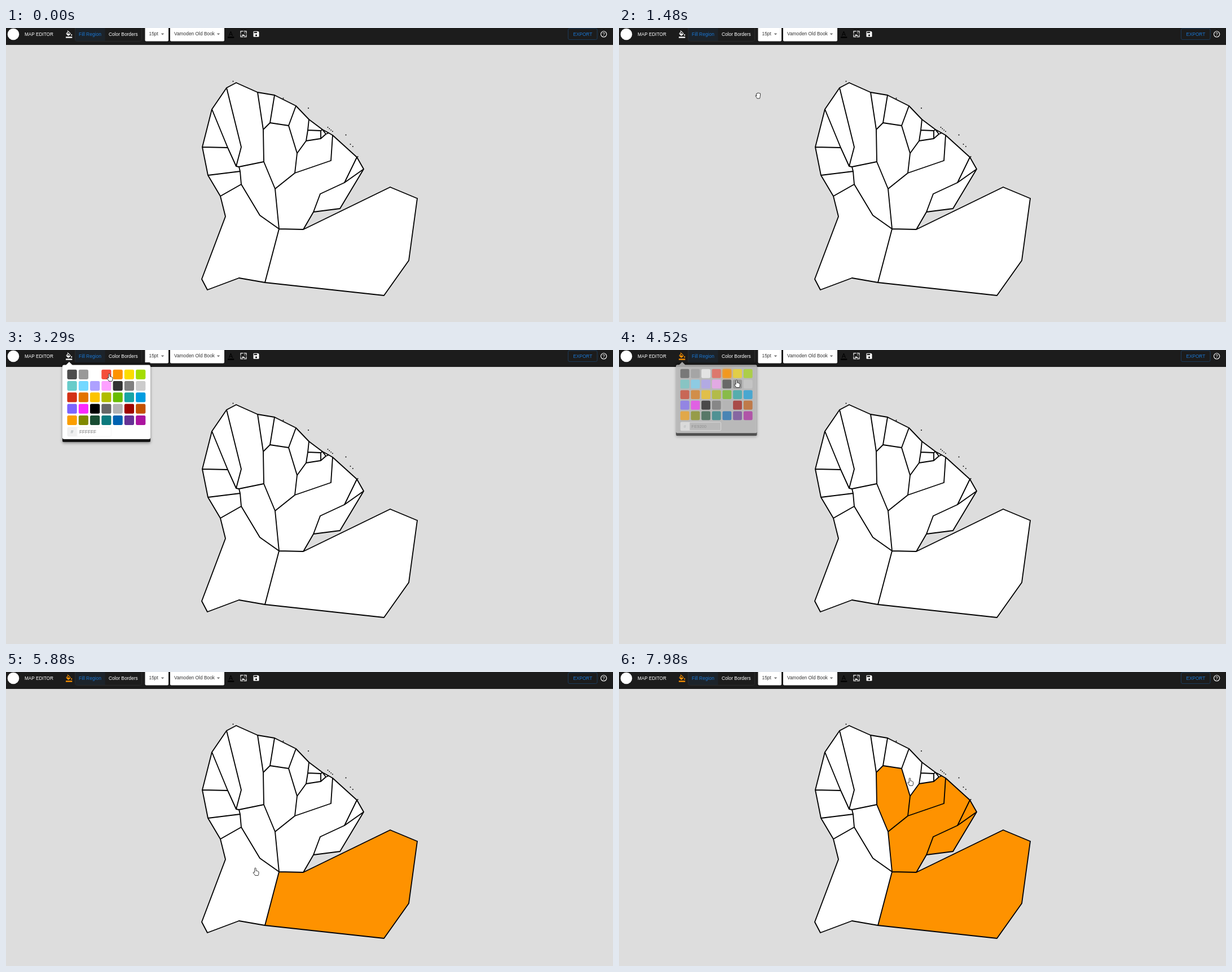
Animation of 1076 by 521 pixels, one loop 8 s. Source, as an HTML page with a canvas:

```html
<!DOCTYPE html>
<html lang="en">
<head>
<meta charset="utf-8">
<title>Map editor</title>
<style>
html, body { margin: 0; width: 100%; height: 100%; overflow: hidden; background: #ddd; }
canvas { display: block; }
</style>
</head>
<body>
<canvas id="stage" width="1076" height="521"></canvas>
<script>
const ctx = document.getElementById('stage').getContext('2d');
const LOOP = 8000;
const BLUE = '#1976d2', ORANGE = '#fe9200', DARK = '#1c1c1c';
const OPEN = 2620, PICK = 4280, CLOSE = 4450, SHIFT = 5270;

// Border corners of the map
const corners = {
  a: [391, 106], b: [408, 97], c: [446, 114], d: [476, 119], e: [514, 138], f: [537, 162],
  g: [561, 180], h: [572, 186], i: [579, 190], j: [622, 229], k: [634, 250], l: [592, 320],
  m: [545, 326], n: [527, 357], o: [484, 356], p: [681, 282], q: [729, 302], r: [714, 412],
  s: [670, 474], t: [459, 451], u: [413, 443], v: [357, 464], w: [347, 445], x: [389, 334],
  y: [380, 298], z: [358, 261], A: [348, 211], B: [365, 144], C: [393, 212], D: [408, 245],
  E: [417, 211], F: [413, 246], G: [417, 277], H: [450, 332], J: [457, 237], K: [456, 180],
  L: [468, 168], M: [501, 173], N: [516, 222], O: [512, 257], P: [477, 285], Q: [532, 200],
  R: [558, 196], S: [535, 181], T: [558, 182], U: [567, 188], V: [576, 235], W: [600, 274],
  X: [557, 294], Y: [415, 254]
};

// Regions as rings of corners; some get coloured at a given time
const blank = 'ABC BaEDC abcKJFDE cdLK deML efSQNM fgTS STRQ gTRU ghU ACDFYz zYGy JPoHGYF yGHotuvwx'.split(' ');
const painted = { onpqrst: SHIFT, POVijWXmno: 6150, KLMNOPJ: 6630, QRUhiVON: 6880, WklmX: 7160, jkW: 7460 };

function ringPath(ring) {
  const path = new Path2D();
  for (const c of ring) path.lineTo(...corners[c]);
  path.closePath();
  return path;
}

// Every shared edge is stroked only once
function borderPath(rings) {
  const path = new Path2D(), seen = new Set();
  for (const ring of rings) [...ring].forEach((c, n) => {
    const edge = [c, ring[(n + 1) % ring.length]].sort();
    if (seen.has(edge.join(''))) return;
    seen.add(edge.join(''));
    path.moveTo(...corners[edge[0]]);
    path.lineTo(...corners[edge[1]]);
  });
  return path;
}

const rings = [...blank, ...Object.keys(painted)];
const regions = rings.map(ring => ({ path: ringPath(ring), at: painted[ring] ?? Infinity }));
const borders = borderPath(rings);

const swatches = ('4d4d4d 999999 ffffff f44e3b fe9200 fcdc00 a4dd00 68ccca 73d8ff aea1ff fda1ff 333333 ' +
  '808080 cccccc d33115 e27300 fcc400 b0bc00 68bc00 16a5a5 009ce0 7b64ff fa28ff 000000 666666 b3b3b3 ' +
  '9f0500 c45100 fb9e00 808900 194d33 0c797d 0062b1 653294 ab149e').split(' ').map(hex => '#' + hex);

const pointer = new Path2D('M-1.2 8V1.2a1.2 1.2 0 0 1 2.4 0V5q2-.5 3.5 1.2 1.3 0 1.3 1.2V10q0 1.6-1 3.4H-.4q-1.2-2.4-3.3-4.5-.3-1.5 1-1.4z');
const grab = new Path2D('M-2 1L-3-2.6q.3-1.5 1.6-.6 .4-2.6 2-1.2 1.3-1.2 2 .5 2-.7 1.9 1.2L4 1.8q-.1 1.5-.9 3.3H-1.4Q-2.5 3-4.2.9q-.2-1.4 1-1z');

// Cursor stops: arrival, rest, x, y
const stops = [[160, 0, 1041, 520], [960, 30, 574, 261], [1480, 0, 246.5, 120], [1790, 30, 152, 43],
  [2220, 400, 110, 9], [3290, 500, 183, 42], [4110, 340, 200, 47], [5110, 0, 581.5, 325],
  [5230, 100, 594, 340], [5880, 0, 441.5, 347.5], [6010, 140, 505, 305], [6470, 160, 488, 238],
  [6880, 0, 546, 218], [7160, 0, 583, 296], [7420, 40, 620, 242], [7980, 20, 515.5, 188]];

const clamp = v => Math.max(0, Math.min(1, v));

// Eases away from and into stops with a rest, passes through the others
function cursorAt(t) {
  const n = stops.findIndex(s => s[0] > t);
  if (n < 0) return stops[stops.length - 1].slice(2);
  const [t0, rest0, x0, y0] = stops[n - 1], [t1, rest1, x1, y1] = stops[n];
  const u = clamp((t - t0 - rest0) / (t1 - t0 - rest0));
  const out = rest0 ? 0 : 1, into = rest1 ? 0 : 1;
  const k = u * u * (3 - 2 * u) + out * u * (1 - u) ** 2 - into * u * u * (1 - u);
  return [x0 + (x1 - x0) * k, y0 + (y1 - y0) * k];
}

function box(x, y, w, h, r, fill, stroke) {
  ctx.beginPath();
  ctx.roundRect(x, y, w, h, r);
  if (fill) { ctx.fillStyle = fill; ctx.fill(); }
  if (stroke) { ctx.strokeStyle = stroke; ctx.lineWidth = 1; ctx.stroke(); }
}

function disc(x, y, r, fill) {
  ctx.beginPath();
  ctx.arc(x, y, r, 0, Math.PI * 2);
  ctx.fillStyle = fill;
  ctx.fill();
}

function text(str, x, y, size, fill, align = 'left') {
  ctx.font = `${size}px "Liberation Sans", Arial, sans-serif`;
  ctx.textAlign = align;
  ctx.fillStyle = fill;
  ctx.fillText(str, x, y);
}

function triangle(x, y, w, h, fill) {
  ctx.beginPath();
  ctx.moveTo(x - w / 2, y);
  ctx.lineTo(x + w / 2, y);
  ctx.lineTo(x, y + h);
  ctx.fillStyle = fill;
  ctx.fill();
}

function at(x, y, draw) {
  ctx.save();
  ctx.translate(x, y);
  draw();
  ctx.restore();
}

function bucketIcon(color) {
  box(-5, 5, 11.3, 2.3, 0, color);
  disc(5.2, 2.2, 1.1, color);
  triangle(5.2, 1.8, 1.8, -1.8, color);
  at(-0.4, -0.6, () => {
    ctx.rotate(Math.PI / 4);
    box(-2.7, -2.7, 5.4, 5.4, 0.8, null, color);
    box(-2.7, -0.2, 5.4, 0.8, 0, color);
    triangle(0, -0.2, 5, 0, color);
    box(-4.8, -2.9, 2.2, 1, 0, color);
  });
  triangle(-0.4, -0.4, 7, 3.5, color);
}

function pictureIcon() {
  ctx.strokeStyle = '#fff';
  ctx.lineWidth = 1.1;
  for (const sx of [-1, 1]) for (const sy of [-1, 1]) {
    ctx.beginPath();
    ctx.moveTo(sx * 0.6, sy * 5);
    ctx.lineTo(sx * 5, sy * 5);
    ctx.lineTo(sx * 5, sy * 0.6);
    ctx.stroke();
  }
  triangle(-1, 3.3, 4.8, -2.8, '#fff');
  triangle(1, 3.3, 4.6, -2.2, '#fff');
  disc(1.9, -2, 0.8, '#fff');
}

function diskIcon() {
  box(-5, -5, 10, 10, [1, 2.6, 1, 1], '#fff');
  box(-3.9, -3.9, 5.6, 2.3, 0, DARK);
  disc(0, 2.2, 1.7, DARK);
}

function helpIcon() {
  ctx.beginPath();
  ctx.arc(0, 0, 5.1, 0, Math.PI * 2);
  ctx.strokeStyle = '#fff';
  ctx.lineWidth = 1.1;
  ctx.stroke();
  text('?', 0, 2.9, 8.2, '#fff', 'center');
}

function drawMap(t) {
  at(0, t < SHIFT ? 0 : -2, () => {
    for (const { path, at } of regions) {
      ctx.fillStyle = t < at ? '#fff' : ORANGE;
      ctx.fill(path);
    }
    ctx.lineCap = 'round';
    ctx.lineWidth = 1.85;
    ctx.strokeStyle = '#000';
    ctx.stroke(borders);
    for (const [x, y] of [[402.5, 94.5], [491.5, 124.5], [536, 142], [602.5, 189.5], [623.5, 228]]) disc(x, y, 1, '#000');
    for (let n = 0; n < 4; n++) disc(570.5 + n * 2.8, 176 + n * 2.4, 0.9, '#000');
    for (let n = 0; n < 2; n++) disc(610.5 + n * 4.3, 206 + n * 4, 0.9, '#000');
  });
}

function drawSelect(x, w, label) {
  box(x, -5, w, 28.5, 2, '#fff');
  text(label, x + 7, 13.3, 8.4, '#333');
  triangle(x + w - 10.5, 9.6, 5.6, 2.9, '#757575');
}

function drawToolbar(t) {
  box(0, 0, 1076, 30, 0, DARK);
  disc(13, 11, 10.3, '#fff');
  text('MAP EDITOR', 33, 13.8, 8.2, '#fff');
  at(111, 10.4, () => bucketIcon(t < CLOSE ? '#fff' : ORANGE));

  box(122.5, -5, 118, 28.5, 3, null, '#2b2b2b');
  box(123, -5, 52.5, 28, 0, '#1c232a');
  text('Fill Region', 129, 13.8, 8.45, BLUE);
  text('Color Borders', 182, 13.8, 8.4, '#fff');
  drawSelect(246.5, 41.5, '15pt');
  drawSelect(291, 96, 'Vamoden Old Book');

  text('A', 398.4, 13.7, 11, '#000', 'center');
  box(393, 15.4, 11.3, 2.3, 0, '#000');
  at(421, 10.6, pictureIcon);
  at(443.5, 10.7, diskIcon);
  box(996.5, 1, 51.5, 19.5, 2.5, null, '#1b3a59');
  text('EXPORT', 1022.3, 13.9, 8.25, BLUE, 'center');
  at(1059.6, 10.9, helpIcon);
}

function drawPicker(t) {
  const shown = t < CLOSE ? clamp((t - OPEN) / 200) : 1 - clamp((t - CLOSE) / 180);
  if (!shown) return;
  at(112, 22, () => {
    ctx.globalAlpha = shown;
    ctx.scale(0.8 + shown * 0.2, 0.8 + shown * 0.2);
    ctx.translate(-112, -22);

    ctx.shadowColor = 'rgba(0,0,0,.4)';
    ctx.shadowBlur = 5;
    ctx.shadowOffsetY = 2;
    box(100, 22, 156, 141, 2, '#151515');
    ctx.shadowOffsetY = 0;
    ctx.shadowColor = 'transparent';
    triangle(112, 27, 12, -6, '#fff');
    box(100, 26.5, 156, 131.5, 3, '#fff');

    swatches.forEach((color, n) => {
      ctx.shadowColor = color === ORANGE && t >= PICK ? color : 'transparent';
      box(108.5 + n % 7 * 20.27, 34.8 + Math.floor(n / 7) * 20.27, 17.2, 17.2, 2.4, color);
    });
    ctx.shadowColor = 'transparent';
    box(108.5, 136.5, 17.2, 17, [2.4, 0, 0, 2.4], '#f0f0f0');
    text('#', 117.1, 148, 8.4, '#98a1a4', 'center');
    box(126, 137, 60.5, 16, [0, 2, 2, 0], null, '#f4f4f4');
    text(t < CLOSE ? 'FFFFFF' : 'FE9200', 130, 148, 8.2, '#777');
  });
}

function drawTooltip(t) {
  if (t >= OPEN) return;
  ctx.globalAlpha = clamp((t - 2080) / 120);
  box(95, 30, 33, 11.3, 2, '#000');
  text('Fill Color', 111.5, 37.8, 6.3, '#fff', 'center');
  ctx.globalAlpha = 1;
}

function drawCursor(t) {
  if (t < stops[0][0]) return;
  const [x, y] = cursorAt(t);
  const overMap = regions.some(r => ctx.isPointInPath(r.path, x, y));
  const overUi = y < 30 || (t > OPEN && t < CLOSE + 100);
  const shape = overMap || overUi || t > 5000 ? pointer : grab;
  at(x, y, () => {
    ctx.lineJoin = 'round';
    ctx.lineWidth = 0.9;
    ctx.fillStyle = '#fff';
    ctx.strokeStyle = '#222';
    ctx.fill(shape);
    ctx.stroke(shape);
  });
}

function frame() {
  const t = performance.now() % LOOP;
  box(0, 0, 1076, 521, 0, '#ddd');
  drawMap(t);
  drawToolbar(t);
  drawPicker(t);
  drawTooltip(t);
  drawCursor(t);
  requestAnimationFrame(frame);
}
frame();
</script>
</body>
</html>
```
